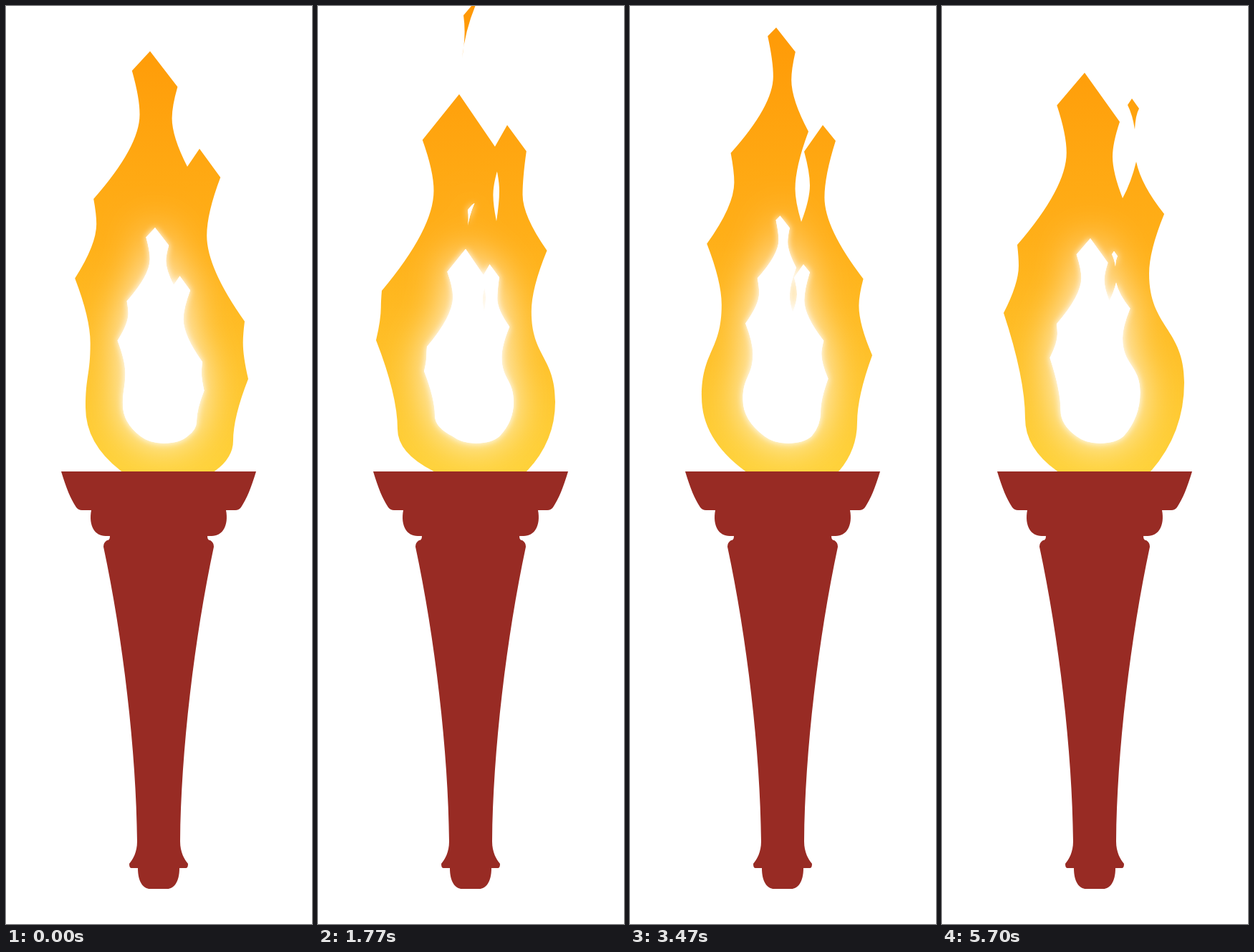
These frames come from a looping animation (427x1280 px, 5730 ms). An HTML page with a canvas:

```html
<!DOCTYPE html>
<html lang="en">
<head>
<meta charset="utf-8">
<title>Torch</title>
<style>
html, body { margin: 0; height: 100%; overflow: hidden; background: #fff; }
canvas { display: block; }
</style>
</head>
<body>
<canvas id="stage" width="427" height="1280"></canvas>
<script>
const ctx = document.getElementById('stage').getContext('2d');
const LOOP = 5730;
const RIM = 648;

// A contour feature rising with the flame: position by age in steps.
const track = (x, y, vx, vy, ax = 0) => s => [x + vx * s + ax * s * s, y + vy * s];
// A soft point has a vertical tangent; all others are corners.
const soft = ([x, y]) => [x, y, 1];
const softTrack = (...a) => s => soft(track(...a)(s));

// Left edge: two corners and the hollows below them
const leftA = track(86, 428, 9.75, -48.25, .44);
const leftB = track(105, 333, 16.6, -64, .6);
const hollowA = softTrack(108, 523, 9.4, -53.1, .26);
const hollowB = softTrack(107, 362, 19.2, -58);

// Right edge
const rightA = track(345, 596, -1.5, -51, -.72);
const rightB = track(338.4, 499, -4.37, -59.3, -1.03);
const dipA = softTrack(289, 373, -8.8, -53);
const dipB = softTrack(342, 521, -11.3, -51.6);

// Right side of the main tongue
const innerA = track(248, 161.5, -8.6, -48.7);
const innerB = track(270, 305, -10.5, -65);
const bayA = softTrack(238, 210, -6.4, -53.5);
const bayB = softTrack(252.5, 370, -11, -57.5);

const tips = [[199, 93], [201, 63], [204, 30], [211, 0], [217, 22], [197, 123]];
const bulgeL = [[116, 575], [111, 560], [100, 545], [89, 518], [82, 483], [111, 590]].map(soft);
const bulgeR = [[338, 525], [317, 606], [317, 580], [316, 590], [322, 578], [331, 552]].map(soft);

// Loose sparks and the thin slot
const extras = {
  0: 'M265 129L275 143Q270 152 269 172Q266 152 259 138Z',
  3: 'M267 129L273 138Q273 150 264 168Q264 152 258 143Z',
  4: 'M250 299Q246.5 320 250 341Q254 320 250 299Z',
  5: 'M203 13L214 0L222 -6Q206 30 201 72Q207 40 203 13Z'
};

function leftEdge(p) {
  if (p === 5) return [[81, 466], hollowB(-1), leftB(-1), hollowA(5), leftA(5)];
  const edge = [leftA(p), hollowB(p), leftB(p)];
  if (p > 0) edge.unshift(hollowA(p));
  if (p < 4) edge.push(hollowA(p + 6));
  if (p < 3) edge.push(leftA(p + 6));
  return edge;
}

// Main tongue down to the valley, then the side tongue up to its peak
const middle = [
  () => [innerA(0), bayA(0), [252, 268], [264, 246, 271, 217], [278, 250, ...rightA(6)]],
  () => [innerA(1), bayA(1), [253, 224], [270, 199], rightA(7)],
  () => [innerA(2), bayA(2), innerB(2), bayB(2), [239, 301], soft([251, 250]), [243, 203], [269, 166], rightA(8)],
  () => [innerA(3), bayA(3), innerB(3), bayB(3), [240, 268], [255, 250, 262, 222], [274, 266, ...rightB(3)]],
  () => [innerB(4), bayB(4), [241, 230], [263, 200], rightB(4)],
  () => [innerA(-1), bayA(-1), [249, 300], soft([253, 258]), [243, 203], [264, 166], rightB(5)]
];

function rightEdge(p) {
  if (p === 0) return [dipA(0)];
  if (p === 1) return [dipA(1), rightB(1), dipB(1), [338, 520]];
  if (p === 2) return [dipA(2), rightB(2), dipB(2), [338, 487]];
  return [dipB(p), rightA(p), dipA(p - 6)];
}

// Curve leaving the soft point vertically; fuller towards the rim
function bend([sx, sy], [, cy]) {
  return [sx, sy + (cy - sy) * (cy === RIM ? .57 : .38)];
}

function flame(p) {
  const points = [bulgeL[p], ...leftEdge(p), tips[p], ...middle[p](), ...rightEdge(p), bulgeR[p], [292, RIM]];
  const path = new Path2D();
  let from = [160, RIM];
  path.moveTo(...from);
  for (const to of points) {
    const [x, y] = to, [px, py] = from, mid = (y + py) / 2;
    if (to.length === 4) path.quadraticCurveTo(...to);
    else if (to[2] && from[2]) path.bezierCurveTo(px, mid, x, mid, x, y);
    else if (to[2]) path.quadraticCurveTo(...bend(to, from), x, y);
    else if (from[2]) path.quadraticCurveTo(...bend(from, to), x, y);
    else path.lineTo(x, y);
    from = to.length === 4 ? to.slice(2) : to;
  }
  path.quadraticCurveTo(270, 668, 225, 668);
  path.quadraticCurveTo(185, 668, 160, RIM);
  path.closePath();
  if (extras[p]) path.addPath(new Path2D(extras[p]));
  return path;
}

const flames = tips.map((_, p) => flame(p));
const halfTorch = new Path2D('M212 649H349C342 672 336 687 328 699Q325 703 320 703H307' +
  'C311 725 302 739 287 739H281Q281 745 285 745Q290 748 290 754C263 880 244 1040 243 1165' +
  'C243 1180 249 1190 254 1196Q254 1202 251 1202H242C242 1222 234 1231 225 1231H212Z');

const fire = ctx.createLinearGradient(0, 0, 0, RIM);
fire.addColorStop(0, '#ff9805');
fire.addColorStop(.5, '#ffaf18');
fire.addColorStop(1, '#fed238');

function draw(p) {
  ctx.clearRect(0, 0, 427, 1280);
  ctx.fillStyle = fire;
  ctx.fill(flames[p]);

  // White core: the same flame at half size, with a wide and a tight glow
  ctx.save();
  ctx.transform(.5, 0, 0, .497, 107.5, 277.7);
  ctx.fillStyle = ctx.shadowColor = '#fff';
  for (const blur of [58, 10]) {
    ctx.shadowBlur = blur;
    ctx.fill(flames[p]);
  }
  ctx.restore();

  ctx.clearRect(0, 649, 427, 631);
  ctx.save();
  ctx.fillStyle = '#982b24';
  ctx.fill(halfTorch);
  ctx.transform(-1, 0, 0, 1, 426, 0);
  ctx.fill(halfTorch);
  ctx.restore();
}

// One pose per 80 ms, shown on a 30 fps grid with times rounded to 10 ms
let shown = -1;
function tick() {
  const t = performance.now() % LOOP;
  const grid = Math.floor((Math.floor(t / 10) + .49) * .3);
  const pose = (Math.floor(grid * 5 / 12) + 1) % 6;
  if (pose !== shown) draw(shown = pose);
  requestAnimationFrame(tick);
}
tick();
</script>
</body>
</html>
```
